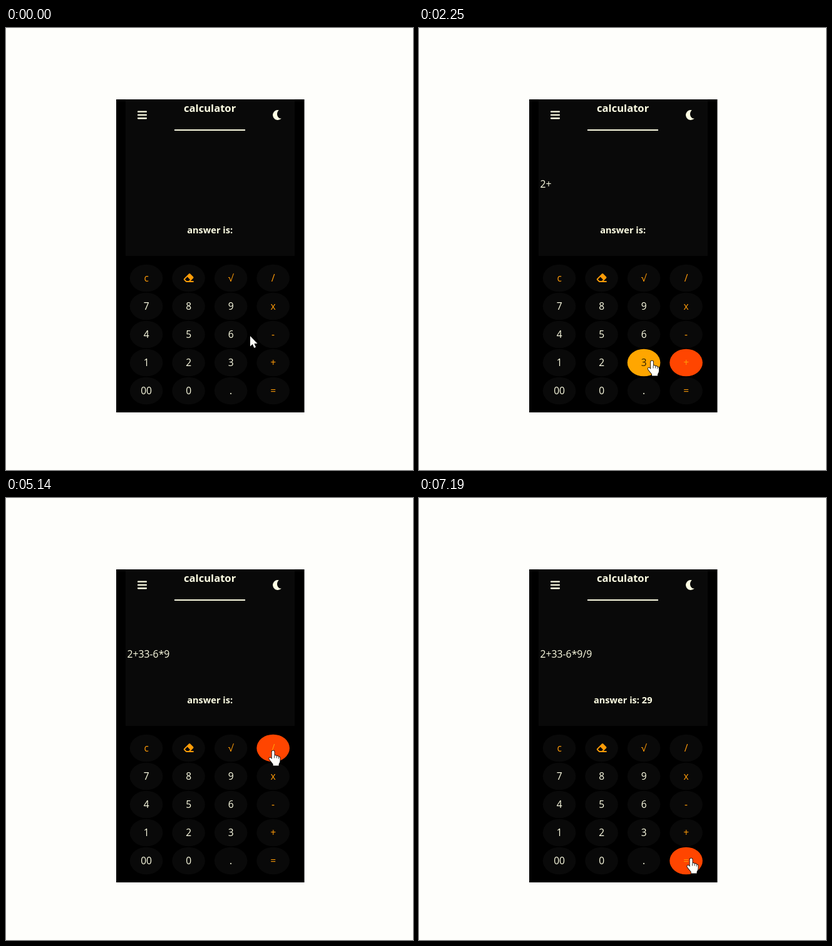
Recreate the animation shown at these times as an HTML page with a canvas. Size 650 by 706 pixels, loop 8 s.

```html
<!DOCTYPE html>
<html lang="en">
<head>
<meta charset="utf-8">
<title>Calculator</title>
<style>
  html, body { margin: 0; width: 100%; height: 100%; overflow: hidden; background: #fefefb; }
  canvas { display: block; }
</style>
</head>
<body>
<canvas id="stage" width="650" height="706"></canvas>
<script>
const ctx = document.getElementById('stage').getContext('2d');
const LOOP = 8000, MS_PER_PX = 2.5, CLICK_DELAY = 80;
const RX = 26.3, RY = 21.8;
const FONT = '"Open Sans", "Noto Sans", sans-serif';
const PAGE = '#fefefb', CREAM = '#ffffe4', ORANGE = '#ff9c08';
const HOVER = '#ffa600', FOCUS = '#ff4500', DARK = '#090909';

const buttons = [...'cE√/789x456-123+', '00', '0', '.', '='].map((label, i) => ({
  label,
  x: 224.1 + 67.5 * (i % 4),
  y: 399.5 + 45 * Math.floor(i / 4),
  operator: i < 4 || i % 4 === 3
}));

// Each visit: key, arrival time, offset from the key's centre, wait before the press (0 = only passing)
const visits = [
  ['0', 290, 17, -7, 0],
  ['2', 640, -6, -2, 540],
  ['+', 1600, 7, 0, CLICK_DELAY],
  ['3', 2240, 13, -3, 200],
  ['3', 2480, 13, -3, CLICK_DELAY],
  ['+', 2840, 19, 0, 0],
  ['-', 3220, 3, 0, CLICK_DELAY],
  ['6', 3575, 20, -4, CLICK_DELAY],
  ['x', 4100, 3, -4, CLICK_DELAY],
  ['9', 4560, 3, 4, CLICK_DELAY],
  ['/', 5050, 0, 4, CLICK_DELAY],
  ['9', 5620, 5, -8, CLICK_DELAY],
  ['/', 6310, -5, 14, 0],
  ['+', 6430, -14, -3, 0],
  ['=', 6740, 8, -4, 370]
];

const stops = [{ x: 390, y: 492, arrive: 80 }];
for (const [key, arrive, dx, dy, wait] of visits) {
  const b = buttons.find(b => b.label === key), from = stops[stops.length - 1];
  const x = b.x + dx, y = b.y + dy;
  const travel = MS_PER_PX * Math.hypot(x - from.x, y - from.y);
  stops.push({ key, x, y, arrive, depart: Math.max(from.arrive, arrive - travel), press: wait && arrive + wait });
}
const presses = stops.filter(s => s.press);

const eraser = new Path2D('M498 274Q520 240 498 206L338 46Q304 24 270 46L14 302Q-8 336 14 370L110 466Q124 480 144 480H512V416H356ZM195 211L333 349 265 416H150L70 336Z');
const arrow = new Path2D('M0 0V16.5L3.8 13 6.3 19 9 17.8 6.5 12H11.5Z');
const hand = new Path2D('M-2 2Q-2 0 0 0T2 2V8Q5 7 5.5 9Q8 8 8.7 10Q11 9.6 11 12V16Q11 19 9 21.5V24H0V21.5L-6 14Q-7 11-4.5 11L-2 13.5Z');
const knuckles = new Path2D('M2 8V12M5.5 9V12M8.7 10V13');

function pointerAt(t) {
  const i = stops.findIndex(s => s.arrive > t);
  if (i === 0) return stops[0];
  if (i < 0) return stops[stops.length - 1];
  const a = stops[i - 1], b = stops[i];
  const u = Math.max(0, (t - b.depart) / (b.arrive - b.depart));
  const k = u * u * (3 - 2 * u);
  return { x: a.x + (b.x - a.x) * k, y: a.y + (b.y - a.y) * k };
}

function text(str, x, y, size, color, weight = 400, align = 'center') {
  ctx.font = `${weight} ${size}px ${FONT}`;
  ctx.textAlign = align;
  ctx.fillStyle = color;
  ctx.fillText(str, x, y);
}

function rect(x, y, w, h, color) {
  ctx.fillStyle = color;
  ctx.fillRect(x, y, w, h);
}

function drawHeader() {
  ctx.fillStyle = CREAM;
  for (let i = 0; i < 3; i++) {
    ctx.beginPath();
    ctx.roundRect(210, 132.4 + 5.3 * i, 15, 2.4, 0.8);
    ctx.fill();
  }
  text('calculator', 325.6, 134, 16.6, CREAM, 700);
  rect(269, 162, 113, 2, CREAM);

  ctx.beginPath();
  ctx.arc(434, 139, 8, -1.35, 0.72, true);
  ctx.bezierCurveTo(434, 146, 430, 136, 435.8, 131.2);
  ctx.fill();
}

function drawButton(b, hovered, focused) {
  ctx.beginPath();
  ctx.ellipse(b.x, b.y, RX, RY, 0, 0, Math.PI * 2);
  ctx.fillStyle = focused ? FOCUS : hovered ? HOVER : DARK;
  ctx.fill();

  let color = CREAM;
  if (b.operator) color = hovered && !focused ? HOVER : ORANGE;
  else if (hovered) color = '#302400';

  if (b.label === 'E') {
    ctx.save();
    ctx.translate(b.x - 8, 391);
    ctx.scale(1 / 32, 1 / 32);
    ctx.fillStyle = color;
    ctx.fill(eraser, 'evenodd');
    ctx.restore();
  } else {
    text(b.label, b.x, b.y + 5.5, 15.6, color);
  }
}

function drawPointer(p, overButton) {
  const shape = overButton ? hand : arrow;
  ctx.save();
  ctx.translate(p.x, p.y);
  ctx.lineWidth = 1.6;
  ctx.lineJoin = 'round';
  ctx.strokeStyle = '#000';
  ctx.stroke(shape);
  ctx.fillStyle = '#fffffa';
  ctx.fill(shape);
  if (overButton) {
    ctx.lineWidth = 0.8;
    ctx.stroke(knuckles);
  }
  ctx.restore();
}

function draw(t) {
  const typed = presses.filter(p => p.press + CLICK_DELAY <= t).map(p => p.key).join('');
  const entry = typed.replace('x', '*').replace('=', '');
  const answer = typed.endsWith('=') ? 'answer is: 29' : 'answer is:';

  rect(0, 0, 650, 706, PAGE);
  rect(176, 114, 300.5, 500, '#000');
  rect(191, 114, 270, 250, DARK);
  drawHeader();
  text(entry, 193.4, 255, 15.8, CREAM, 400, 'left');
  text(answer, 325.7, 328, 14.6, CREAM, 700);

  const pointer = pointerAt(t);
  const over = buttons.find(b => Math.hypot((pointer.x - b.x) / RX, (pointer.y - b.y) / RY) <= 1);
  const focus = presses.filter(p => p.press <= t).pop();
  for (const b of buttons) drawButton(b, b === over, focus?.key === b.label);
  drawPointer(pointer, !!over);
}

const start = performance.now();
function tick() {
  draw((performance.now() - start) % LOOP);
  requestAnimationFrame(tick);
}
tick();
</script>
</body>
</html>
```
